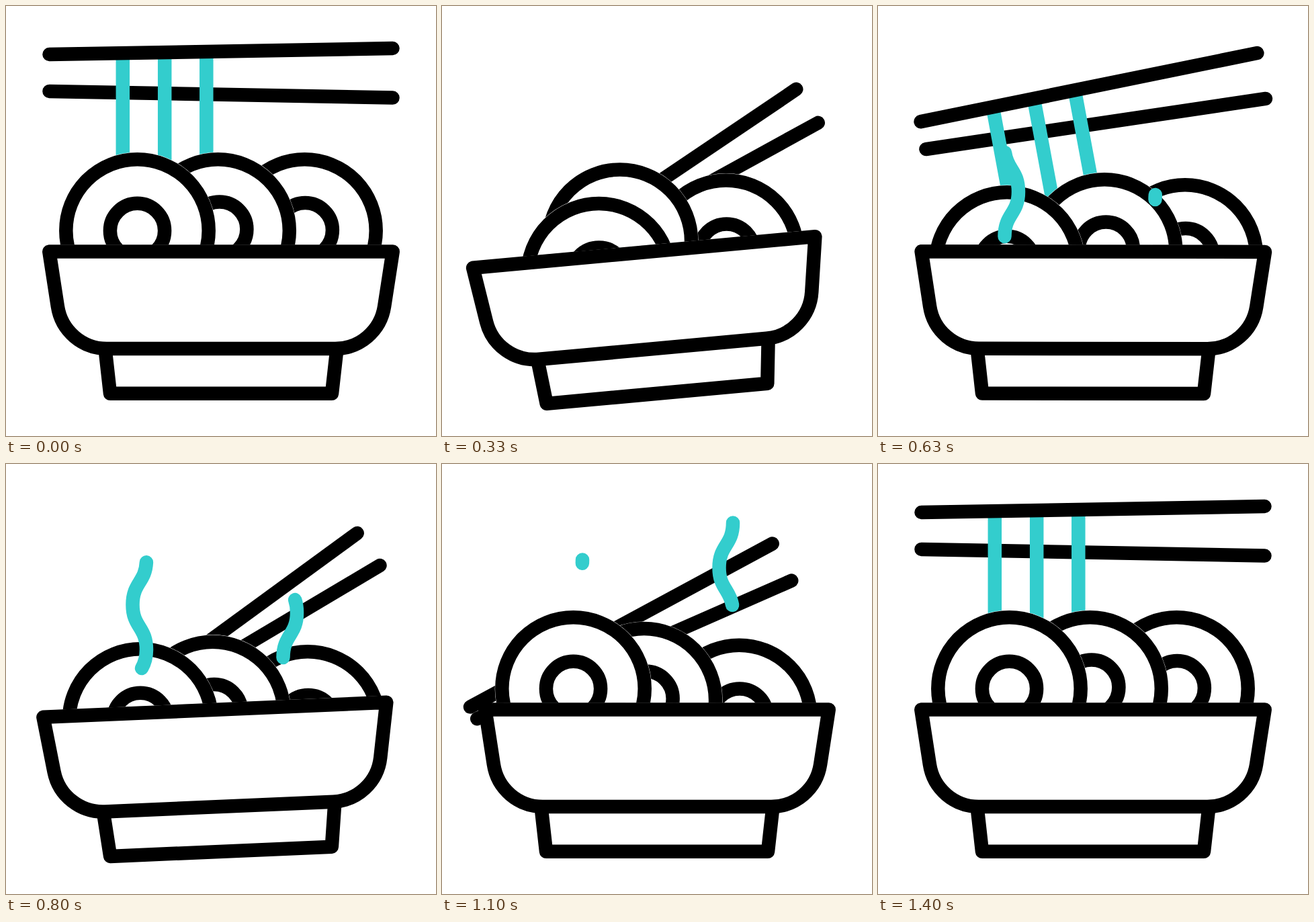
Write an HTML page that moves like this. It is 640 by 640 pixels and loops after 1670 ms.

```html
<!DOCTYPE html>
<html lang="en">
<head>
<meta charset="utf-8">
<title>Noodle bowl</title>
<style>
  html, body { margin: 0; width: 100%; height: 100%; overflow: hidden; background: #fff; }
  svg { display: block; width: 100vw; height: 100vh; }
  .ink { stroke: #000; stroke-width: 20.5; stroke-linecap: round; stroke-linejoin: round; fill: #fff; }
  .teal { stroke: #33cdcd; stroke-width: 20.5; fill: none; }
  .steam { stroke-linecap: round; }
</style>
</head>
<body>
<svg viewBox="0 0 640 640">
  <defs>
    <clipPath id="aboveRim"><rect id="rimClip" x="-400" y="-400" width="1440" height="755.5"/></clipPath>
    <g id="noodle">
      <circle r="116.8" fill="#fff"/>
      <circle r="106.2" class="ink"/>
    </g>
  </defs>
  <g id="sticks">
    <path id="lower" class="ink" d="M575.5 136.5L64.5 127"/>
    <path class="teal" d="M173.8 70V260M236.2 70V260M298.3 70V260"/>
    <path class="ink" d="M575.5 63L64.5 72"/>
  </g>
  <g clip-path="url(#aboveRim)">
    <g id="ringC"><use href="#noodle"/><circle class="ink" cx=".8" cy="-.8" r="40.6"/></g>
    <g id="ringB"><use href="#noodle"/><circle class="ink" cx="2.2" cy="-2.2" r="40.6"/></g>
    <g id="ringA"><use href="#noodle"/><circle class="ink" r="40.6"/></g>
  </g>
  <g id="bowl" class="ink">
    <path d="M147.5 510L155 576.8H485L492.5 510"/>
    <path d="M64.3 365.6H575.7L563.1 447.3A74 74 0 0 1 490 510H150A74 74 0 0 1 76.9 447.3Z"/>
  </g>
  <path id="steamL" class="teal steam" pathLength="1"/>
  <path id="steamR" class="teal steam" pathLength="1" transform="translate(224 -55)"/>
</svg>
<script>
const LOOP = 1670, LAST = 42;
const set = (id, name, value) => document.getElementById(id).setAttribute(name, value);

const smooth = x => {
  x = Math.min(1, Math.max(0, x));
  return x * x * (3 - 2 * x);
};

// Eased steps between [time, value] keys, at rest on every key.
function ease(keys, n) {
  let i = 1;
  while (i < keys.length - 1 && n > keys[i][0]) i++;
  const [t0, a] = keys[i - 1], [t1, b] = keys[i];
  return a + (b - a) * smooth((n - t0) / (t1 - t0));
}

// Times are in ticks of 1/30 s.
// The bowl rocks and settles; the sticks dip twice and swing left on the way out.
const TILT = [[0, 0], [7.15, -9.3], [15.3, 5.15], [21.6, -2.9], [31.6, 0]];
const SWING = [[0, 0], [7.3, -46.4], [14.9, 0], [28, -45.2], [39.65, 0]];
const DIP = [[0, 0], [7.3, 279], [14.95, 0], [28.6, 253], [40.3, 0]];
const DRIFT = [[0, 0], [16, -6.7], [27, -3], [33.5, -54], [40, 0]];

// Each ring is tossed about on shared beats, then returns home in turn.
const BEATS = [5, 13, 19, 29];
const REST_Y = 334.4;
const rings = [
  { id: 'ringA', home: 195.5, sway: [69.5, 23.5, -3.5, 12.5], sink: [35, 80, 49, 45] },
  { id: 'ringB', home: 315.6, sway: [-108.6, -24, 21.5, -37.5], sink: [63.5, -7, 30, 43] },
  { id: 'ringC', home: 444.5, sway: [-31, -17.5, 12.5, -3.5], sink: [15, 39, 38, 64] }
];
rings.forEach((ring, i) => {
  const track = offsets => [[0, 0], ...BEATS.map((t, k) => [t, offsets[k]]), [33 + 3 * i, 0]];
  ring.dx = track(ring.sway);
  ring.dy = track(ring.sink);
});

// Steam: three half waves, drawn on from below and then wiped the same way.
const wave = 'M188.5 343' + [20.5, -20.5, 20.5].map(w => `c0 -34 ${w} -33 ${w} -66.8`).join('');
set('steamL', 'd', wave);
set('steamR', 'd', wave);

function steam(id, n) {
  const head = smooth((n - 10.4) / 14.7), tail = smooth((n - 19.9) / 14.4);
  const shown = head > 0 && tail < 1;
  set(id, 'visibility', shown ? 'visible' : 'hidden');
  set(id, 'stroke-dasharray', `${Math.max(head - tail, 0.001)} 3`);
  set(id, 'stroke-dashoffset', -tail);
}

function draw(n) {
  const turn = `rotate(${ease(TILT, n)} 320 577)`;
  set('bowl', 'transform', turn);
  set('rimClip', 'transform', turn);

  const swing = ease(SWING, n);
  const pinch = Math.min(1, -swing / 38);
  set('sticks', 'transform',
    `translate(${ease(DRIFT, n)} ${ease(DIP, n)}) rotate(${swing} 320 67.5)`);
  set('lower', 'transform', `translate(0 ${-16 * pinch}) rotate(${3.6 * pinch} 575.5 136.5)`);

  for (const { id, home, dx, dy } of rings) {
    set(id, 'transform', `translate(${home + ease(dx, n)} ${REST_Y + ease(dy, n)})`);
  }
  steam('steamL', n);
  steam('steamR', n - 7);
}

// The picture steps 30 times a second, on whole hundredths.
function tick(ms) {
  let n = Math.ceil(ms * 0.03);
  while (Math.round(n * 10 / 3) * 10 > ms) n--;
  return Math.min(n, LAST);
}

const start = performance.now();
function loop() {
  draw(tick((performance.now() - start) % LOOP));
  requestAnimationFrame(loop);
}
draw(0);
requestAnimationFrame(loop);
</script>
</body>
</html>
```
